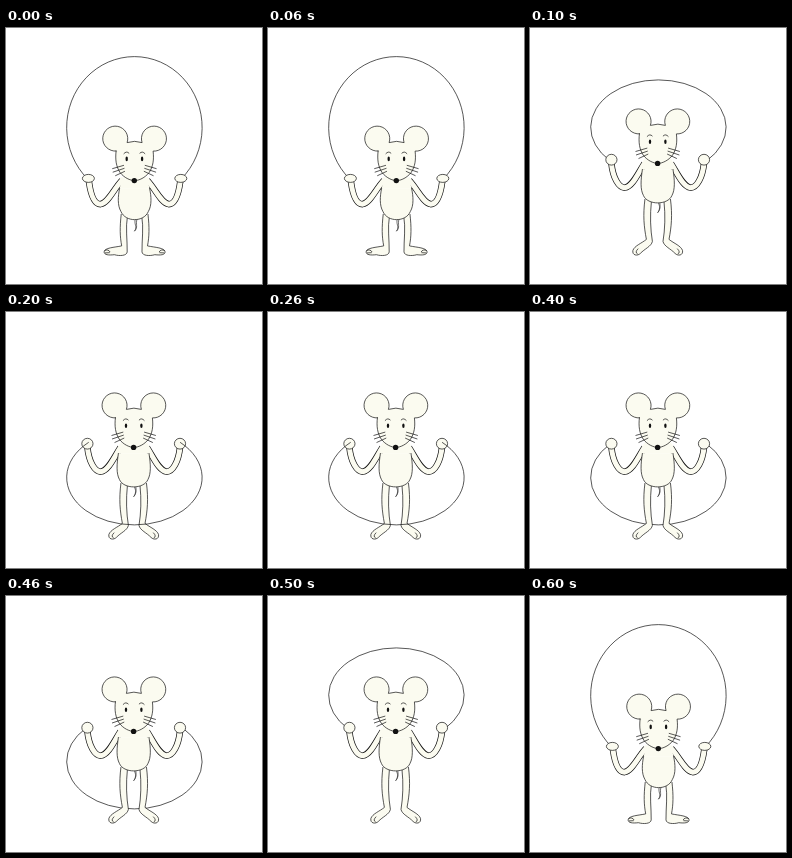
Animation, 256 px wide and 256 px high, one loop 700 ms. Source, as an HTML page:

```html
<!DOCTYPE html>
<html lang="en">
<head>
<meta charset="utf-8">
<title>Mouse skipping rope</title>
<style>
  html, body { margin: 0; width: 100%; height: 100%; overflow: hidden; background: #fff; }
  svg { display: block; width: 100vw; height: 100vh; }
</style>
</head>
<body>
<svg id="stage" viewBox="-0.4 -0.4 256 256"></svg>
<script>
const FUR = '#fbfbf0';
const INK = '#111';
const LINE = 0.7;
const STEP = 100;

const path = (d, fill = FUR, width = LINE, stroke = INK) =>
  `<path d="${d}" fill="${fill}" stroke="${stroke}" stroke-width="${width}" stroke-linecap="round" stroke-linejoin="round"/>`;
const line = (d, width = LINE) => path(d, 'none', width);
const ellipse = (x, y, rx, ry) =>
  `<ellipse cx="${x}" cy="${y}" rx="${rx}" ry="${ry}" fill="${FUR}" stroke="${INK}" stroke-width="${LINE}"/>`;
const move = (x, y, content) => `<g transform="translate(${x} ${y})">${content}</g>`;
const both = (axis, content) =>
  content + `<g transform="translate(${2 * axis} 0) scale(-1 1)">${content}</g>`;

// An outlined tube with open ends
const limb = d =>
  `<path d="${d}" fill="none" stroke="${INK}" stroke-width="6.4"/>` +
  `<path d="${d}" fill="none" stroke="${FUR}" stroke-width="5" stroke-linecap="square"/>`;

// The neck hides the shoulder seam, the outline runs from armpit to armpit
const torso = (neck, outline) => path(neck, FUR, 0) + path(outline);

const headOutline = 'M109 105.5A12.5 12.5 0 1 1 120 97Q127.5 94.5 135 97' +
  'A12.5 12.5 0 1 1 146 105.5C147 114 146 121 142 127C138 132 132 135 127.5 135' +
  'C123 135 117 132 113 127C109 121 108 114 109 105.5Z';

const head = path(headOutline) +
  both(127.3,
    `<ellipse cx="119.6" cy="113.3" rx="1.2" ry="2.3" fill="${INK}"/>` +
    line('M116.8 108Q119.3 105 121.8 107.5') +
    line('M105.5 123L116.5 119.8M106 126.5L117 122.8M108.5 130L117.5 125.8')) +
  `<circle cx="127.2" cy="135" r="2.7" fill="${INK}"/>`;

const standing =
  line('M129 190C127 196 131.5 198 128.3 202.5M130.5 191C129 196 132 199 128.3 202.5', 0.6) +
  both(128.2,
    path('M114.8 186C113.3 199 113.5 208 115.3 217.5C108 219 98 219.3 97.7 223.5C97.7 226.5 102 227 108 226.3' +
      'C113 227.8 120.5 227.5 120.8 223.5C121 212 119 199 121 188') +
    line('M98.5 222Q102 220.5 103.5 223.3M99 224.5L103 224.3') +
    limb('M82.5 153C84 164 87 175.8 94 175.8C102 174.5 107 161 115.5 152') +
    ellipse(82, 150, 6, 4)) +
  torso('M116 149L113.2 160L143.2 160L140.4 149Z',
    'M113.2 160C111.5 168 111 177 114.5 183C119 194 137.5 194 142 183C145.5 177 145 168 143.2 160') +
  move(0.7, 17.2, head);

const stretchedFeet =
  path('M114.5 171C112.5 187 113.5 198 116 211C111 215 104 217.5 102.5 222C101.5 227 107 228 110 225' +
    'C114 220.5 121 218 122 213C120 201 119.5 187 121 173') +
  line('M107.5 220.5Q104 224 107 225.5');
const hangingFeet =
  path('M114.5 171C112 190 113.5 207 117.5 223C116 228 108.5 233 109 238.5C110 242.5 115.5 242.5 117 239.5' +
    'C117 234.5 122 229 122 225C119 208 119 190 121 173') +
  line('M112.5 235.5Q111 239 113.5 240');

const airborne = feet =>
  line('M127.7 174C130 178 129.5 181 127.5 184M129.2 174C130.5 178 129.5 182 127.5 184', 0.6) +
  both(127.3,
    feet +
    limb('M81 135C82.5 149 88 159.3 94.5 159.3C102 158.3 107 146 114 135') +
    ellipse(81, 131.3, 5.6, 5.4)) +
  torso('M114 130L112 141L142.6 141L141 130Z',
    'M112 141C110.3 152 109.8 161 113 167C117 177 137.6 177 141.6 167C144.8 161 144.3 152 142.6 141') +
  head;

const jumping = airborne(stretchedFeet);
const topOfJump = move(0, -28, airborne(hangingFeet));

// Elliptic rope; side is -1 overhead and 1 underfoot
function rope(centerY, height, side, reach) {
  const radius = 67.8;
  const endY = centerY - side * height * Math.sqrt(1 - (reach / radius) ** 2);
  const sweep = side < 0 ? 1 : 0;
  return line(`M${128 - reach} ${endY}A${radius} ${height} 0 1 ${sweep} ${128 + reach} ${endY}`);
}

const landedPose = rope(99.2, 71, -1, 47) + standing;
const overheadPose = rope(99, 47.5, -1, 49) + jumping;
const frontPose = jumping + rope(165, 47.5, 1, 46);
const underfootPose = rope(156, 72, 1, 49) + topOfJump;
const behindPose = rope(165, 47.5, 1, 49) + jumping;

const cycle = [landedPose, overheadPose, frontPose, underfootPose, behindPose, overheadPose, landedPose];
const stage = document.getElementById('stage');
const start = performance.now();
let shown = null;

function render(time) {
  const index = Math.floor(Math.max(0, time) / STEP) % cycle.length;
  if (index === shown) return;
  shown = index;
  stage.innerHTML = cycle[index];
}

function tick(now) {
  render(now - start);
  requestAnimationFrame(tick);
}

render(0);
requestAnimationFrame(tick);
</script>
</body>
</html>
```
